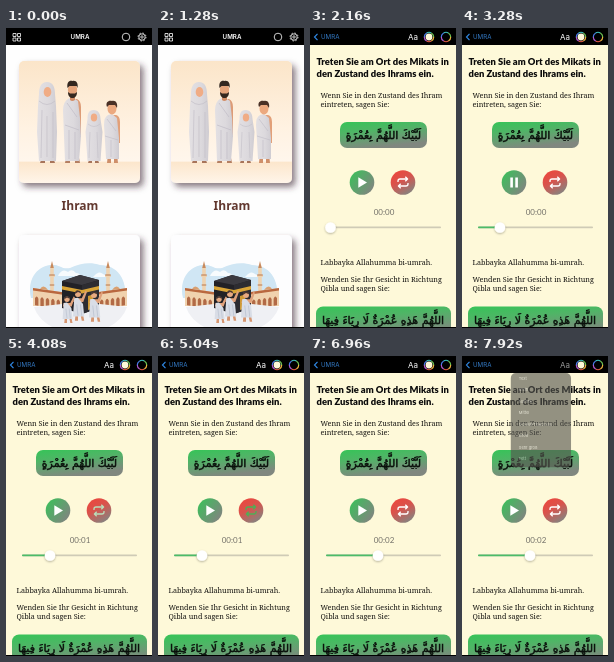
Recreate the animation shown at these times as an HTML page. Size 146 by 300 pixels, loop 8 s.

```html
<!DOCTYPE html>
<html lang="de">
<head>
<meta charset="utf-8">
<title>Umra</title>
<style>
html, body { margin: 0; width: 100%; height: 100%; overflow: hidden; background: #fff; }
svg { display: block; width: 100vw; height: 100vh; }
.title { font: 900 9.4px Lato, sans-serif; fill: #0c0c0c; }
.body { font: 500 7.2px "Noto Serif", serif; fill: #141310; }
.bar { font: 600 6.2px Inter, sans-serif; }
.arabic { font: 11px "DejaVu Sans", sans-serif; fill: #0a100b; stroke: #0a100b; stroke-width: .45; direction: rtl; text-anchor: middle; }
.menu { font: 4px Inter, sans-serif; fill: #d8d8d2; }
</style>
</head>
<body>
<svg viewBox="0 0 146 300" preserveAspectRatio="none">
<defs>
  <linearGradient id="sand" x2="0" y2="1">
    <stop stop-color="#fbe5c9"/><stop offset=".55" stop-color="#fff2e2"/>
    <stop offset=".82" stop-color="#fff6ec"/><stop offset=".83" stop-color="#fce6cc"/><stop offset="1" stop-color="#fff5e9"/>
  </linearGradient>
  <linearGradient id="green" x2=".35" y2="1">
    <stop stop-color="#36c458"/><stop offset=".4" stop-color="#4fb566"/><stop offset="1" stop-color="#80877f"/>
  </linearGradient>
  <linearGradient id="greenDot" x2="1" y2=".7">
    <stop stop-color="#36c458"/><stop offset="1" stop-color="#80857f"/>
  </linearGradient>
  <linearGradient id="redDot" x2=".6" y2="1">
    <stop stop-color="#f0443a"/><stop offset=".5" stop-color="#d9534c"/><stop offset="1" stop-color="#8b807c"/>
  </linearGradient>
  <linearGradient id="robe"><stop stop-color="#e3e0e3"/><stop offset=".6" stop-color="#dcd9dd"/><stop offset="1" stop-color="#cfccd2"/></linearGradient>
  <filter id="shade" x="-20%" y="-20%" width="150%" height="150%">
    <feDropShadow dx="3.5" dy="4" stdDeviation="3" flood-color="#3a2530" flood-opacity=".6"/>
  </filter>
  <filter id="soft" x="-50%" y="-50%" width="200%" height="200%">
    <feDropShadow dx="0" dy="1" stdDeviation="1" flood-opacity=".3"/>
  </filter>
  <clipPath id="card2"><rect x="13" y="207" width="121" height="110" rx="5"/></clipPath>
</defs>

<g id="list">
  <rect width="146" height="300" fill="#fefefe"/>
  <rect x="13" y="33" width="121" height="122" rx="5" fill="url(#sand)" filter="url(#shade)"/>
  <g id="family">
    <!-- mother -->
    <path d="M35 132h4v3h-5zM44 132h4l1 3h-5z" fill="#a8745a"/>
    <path d="M41 54c-6 0-8 5-8 12l-1 12-1 26 2 29h17l1-29-1-26-1-12c0-7-2-12-8-12z" fill="url(#robe)"/>
    <ellipse cx="41.5" cy="64" rx="3.8" ry="5" fill="#f0ac85"/>
    <path d="M33 73q8 7 16 0M36 82l-1 48M47 84v46M41 88v41" fill="none" stroke="#c3bfc8" stroke-width=".7"/>
    <!-- father -->
    <path d="M60 130h4v5h-5zM69 130h4l1 5h-5z" fill="#b57f62"/>
    <path d="M62 71h9q4 2 4 8v30h-4V80z" fill="#dd9c77"/>
    <path d="M62 71l4-2 6 4 2 17 1 18-2 25H59l-1-25-1-26q0-8 5-11z" fill="url(#robe)"/>
    <path d="M61 75l10 14M59 97l14 5M63 102v29M69 104v27" fill="none" stroke="#c0bcc6" stroke-width=".7"/>
    <path d="M64 66h5v6q-3 2-5 0z" fill="#d28d67"/>
    <ellipse cx="66.5" cy="62" rx="4.600" ry="6.300" fill="#e5a57c"/>
    <path d="M61.500 60c-1-6 2-8 5-7 4-1 6 3 5 7l-1-2h-7zM62 64l2 1.500h5l2-1.500c0 4-2 6-4.500 6s-4.500-2-4.500-6z" fill="#33271f"/>
    <!-- daughter -->
    <path d="M83 132h3v3h-4zM89 132h3l1 3h-4z" fill="#a8745a"/>
    <path d="M87.500 82c-5 0-6 4-6 9l-2 13 2 29h13l2-29-2-13c0-5-2-9-7-9z" fill="url(#robe)"/>
    <ellipse cx="88" cy="89.500" rx="3.200" ry="4" fill="#f0ac85"/>
    <path d="M82 96q6 5 12 0M84 104l-1 26M91 104l1 26" fill="none" stroke="#c3bfc8" stroke-width=".6"/>
    <!-- son -->
    <path d="M102 126h3v9h-4zM108 126h3l1 9h-4z" fill="#cf8f6a"/>
    <path d="M102 87h8q4 1 4 7v21h-4V95z" fill="#e2a079"/>
    <path d="M102 87l4-1 5 4 2 20v21h-13l-1-18-1-16q0-8 4-10z" fill="url(#robe)"/>
    <path d="M101 91l9 12M99 108l13 4M105 112v17" fill="none" stroke="#c0bcc6" stroke-width=".6"/>
    <ellipse cx="106" cy="80.500" rx="4.500" ry="6" fill="#eca97f"/>
    <path d="M101 79c-2-5 2-7 5-6 4-1 6 3 5 7l-2-3h-6z" fill="#4a3126"/>
  </g>
  <text x="74" y="182" text-anchor="middle" style="font:800 12px 'Noto Sans',sans-serif" fill="#62382f">Ihram</text>

  <rect x="13" y="207" width="121" height="110" rx="5" fill="#fdfdfe" filter="url(#shade)"/>
  <g clip-path="url(#card2)">
    <path d="M25 270c-4-18 5-31 19-33 8-2 12 5 20 3 10-5 21-6 30-3 17 0 28 14 25 36z" fill="#d0e6f4"/>
    <path d="M53 246q4-6 9-2 4-4 8 1 4 0 4 3H52zM88 248q5-6 9-2l6 3H87z" fill="#f7fbfd"/>
    <g id="towers"></g>
    <g id="arcades"></g>
    <path d="M28 279l28-3h38l27 3q-4 13-20 21H48q-16-8-20-21z" fill="#eff0f4"/>
    <path d="M56 253l18-6 19 5v28l-17 6-20-6z" fill="#222126"/>
    <path d="M56 253l18-6 19 5-17 5z" fill="#3b3a40"/>
    <path d="M76 257l17-5v28l-17 6z" fill="#2d2c31"/>
    <path d="M56 258l20 4 17-4v3.500l-17 4-20-4z" fill="#d9a437"/>
    <path d="M82 268l5-1.500v14l-5 1.500z" fill="#cf9a35"/>
    <g id="pilgrims"></g>
  </g>

  <rect width="146" height="17" fill="#000"/>
  <g fill="none" stroke="#fff" stroke-width=".8">
    <path d="M7 5.500h3v3h-3zM11.500 5.500h3v3h-3zM7 10h3v3h-3zM11.500 10h3v3h-3z"/>
    <circle cx="120" cy="9" r="3.800"/>
    <circle cx="136" cy="9" r="3.200"/><circle cx="136" cy="9" r="1.200"/>
    <circle cx="136" cy="9" r="4" stroke-dasharray="1.570 1.570"/>
  </g>
  <text class="bar" x="74" y="11.300" text-anchor="middle" fill="#fff">UMRA</text>
  <rect id="dim" width="146" height="300" opacity="0"/>
</g>

<g id="detail">
  <rect width="146" height="300" fill="#fef9d9"/>
  <rect width="146" height="17" fill="#000"/>
  <path d="M7.500 5.800L4.500 9l3 3.200" fill="none" stroke="#2f86e0" stroke-width="1.200"/>
  <text class="bar" x="11" y="11.300" fill="#3379c4" style="font-weight:400">UMRA</text>
  <text id="aa" x="98" y="12" fill="#fff" style="font:8px Inter,sans-serif">Aa</text>
  <circle cx="119" cy="9" r="3.400" fill="#fdf8d8"/>
  <g id="rings" fill="none" stroke-width="1.200"></g>

  <text class="title" x="6.500" y="37">Treten Sie am Ort des Mikats in</text>
  <text class="title" x="6.500" y="49">den Zustand des Ihrams ein.</text>
  <text class="body" x="10.500" y="69.500">Wenn Sie in den Zustand des Ihram</text>
  <text class="body" x="10.500" y="79">eintreten, sagen Sie:</text>
  <rect x="30" y="94" width="87" height="26" rx="7" fill="url(#green)"/>
  <text class="arabic" x="73.500" y="110.500">لَبَّيْكَ اللَّهُمَّ بِعُمْرَةٍ</text>

  <circle cx="52" cy="154.500" r="12.300" fill="url(#greenDot)"/>
  <path id="play" d="M48.300 149.300v10.400l8.700-5.200z" fill="#fff"/>
  <path id="pause" d="M48.300 149.500h2.600v10h-2.600zM53.300 149.500h2.600v10h-2.600z" fill="#fff"/>
  <circle cx="93" cy="154.500" r="12.300" fill="url(#redDot)"/>
  <g fill="none" stroke="#fff" stroke-width="1.300" stroke-linejoin="round">
    <path id="repeat" d="M88 154v-1q0-2 2-2h7M95.300 148.800l2.300 2.200-2.300 2.200M98 155v1q0 2-2 2h-7M90.700 155.800l-2.300 2.200 2.300 2.200"/>
  </g>
  <text id="clock" x="74" y="187.300" text-anchor="middle" fill="#74726a" style="font:8px Lato,sans-serif">00:00</text>
  <rect x="16" y="198.600" width="115" height="1.600" rx=".8" fill="#cfcbb6"/>
  <rect id="fill" x="16" y="198.600" width="4" height="1.600" rx=".8" fill="#4cbc68"/>
  <circle id="thumb" cx="20.500" cy="199.500" r="5.300" fill="#fff" filter="url(#soft)"/>

  <text class="body" x="10.500" y="236.500">Labbayka Allahumma bi-umrah.</text>
  <text class="body" x="10.500" y="253.500">Wenden Sie Ihr Gesicht in Richtung</text>
  <text class="body" x="10.500" y="263">Qibla und sagen Sie:</text>
  <rect x="6" y="278.500" width="135" height="30" rx="7" fill="url(#green)"/>
  <text class="arabic" x="73" y="295.500">اللَّهُمَّ هَذِهِ عُمْرَةٌ لَا رِيَاءَ فِيهَا</text>
  <g id="menu">
    <rect x="49" y="17" width="60" height="94" rx="5" fill="#55554f"/>
    <g id="rows"></g>
  </g>
</g>
<rect y="299" width="146" height="1"/>
</svg>
<script>
const LOOP = 8000, START = 20.5, SPEED = 22.2;
const $ = id => document.getElementById(id);
const clamp = v => Math.max(0, Math.min(1, v));
const set = (el, attrs) => { for (const k in attrs) el.setAttribute(k, attrs[k]); };
const each = (id, items, draw) => { $(id).innerHTML = items.map(draw).join(''); };

// Small repeated parts of the drawings
each('towers', [46, 102], x => `
  <path d="M${x - 1.8} 268v-19h-1v-2h1v-7h3.600v7h1v2h-1v19z" fill="#efd3b0"/>
  <path d="M${x - 1.8} 240l1.800-7 1.800 7z" fill="#c98a5c"/>
  <path d="M${x - 2.8} 247h5.600M${x - 2.3} 257h4.600" stroke="#b9764a"/>`);
each('arcades', [[27, 8], [121, -8]], ([x, tilt]) => {
  const dir = Math.sign(tilt);
  let arches = '';
  for (let i = 0; i < 5; i++) arches += `M${2 + i * 5.4} 17v-7q1.700-4 3.400 0v7z`;
  return `<g transform="translate(${x} 260) skewY(${tilt}) scale(${dir} 1)">
    <path d="M0 0h30v14L0 18z" fill="#f0d2ae"/>
    <path d="M0 0h30v2.500H0z" fill="#b9683f"/>
    <path d="${arches}" fill="#b26a46"/>
    <path d="M7 0q4-6 8 0z" fill="#d9a071"/>
  </g>`;
});
each('pilgrims', [[61, 274, 1.1], [72, 269, 1.25], [88, 270, 1.25]], ([x, y, s]) => `
  <g transform="translate(${x} ${y}) scale(${s})">
    <path d="M-2 14h2v5h-2.500zM2 14h2l1 5h-2z" fill="#d59570"/>
    <path d="M-3 1h6l3-6 1.200.7-3 8.300h-8z" fill="#e0a17b"/>
    <path d="M-3 1l3-.5 4 5 1 10h-9z" fill="#d9dde6"/>
    <path d="M-1 6l1 9M2 6l1 9" stroke="#b9c0cf" stroke-width=".6"/>
    <circle cy="-2.500" r="2.400" fill="#e7aa82"/>
    <path d="M-2.500-2.500q0-3 2.600-2.800 2.300 0 2.300 2.300l-2.400-1z" fill="#4a3630"/>
  </g>`);

const hues = ['#f0b640', '#e25a45', '#b65bd0', '#4a7df0', '#3fc3c0', '#6fc955'];
each('rings', [119, 136], x => hues.map((c, i) => {
  const at = k => `${x + 4.7 * Math.cos(k * Math.PI / 3)} ${9 + 4.7 * Math.sin(k * Math.PI / 3)}`;
  return `<path d="M${at(i)}A4.7 4.7 0 0 1 ${at(i + 1)}" stroke="${c}"/>`;
}).join(''));
each('rows', ['Text', 'Klein', 'Normal', 'Mittel', 'SCHRIFTGRÖSSE', 'Groß', 'Sehr groß', 'Fett'],
  (s, i) => `<text class="menu" x="57" y="${24 + i * 11.4}">${s}</text>`);

// [time, slider position]
const track = [[0, START], [2480, START], [3560, 44], [5200, 44], [6280, 68], [LOOP, 68]];
const between = (t, a, b) => t >= a && t < b;
function sample(keys, t) {
  const i = keys.findIndex(k => k[0] > t);
  const [t0, v0] = keys[i - 1], [t1, v1] = keys[i];
  return v0 + (v1 - v0) * (t - t0) / (t1 - t0);
}

function draw(t) {
  const push = 1 - Math.pow(1 - clamp((t - 1400) / 440), 3);
  set($('list'), { transform: `translate(${-44 * push} 0)`, visibility: push < 1 ? 'visible' : 'hidden' });
  set($('dim'), { opacity: .12 * push });
  set($('detail'), { transform: `translate(${146 * (1 - push)} 0)`, visibility: push > 0 ? 'visible' : 'hidden' });

  const x = sample(track, t);
  const playing = between(t, 2480, 3560) || between(t, 5200, 6280);
  set($('thumb'), { cx: x });
  set($('fill'), { width: x - 16 });
  $('clock').textContent = '00:0' + Math.floor((x - START) / SPEED);
  set($('play'), { opacity: playing ? 0 : 1 });
  set($('pause'), { opacity: playing ? 1 : 0 });

  const looped = clamp((t - 4000) / 200) - clamp((t - 6760) / 200);
  set($('repeat'), { stroke: `color-mix(in srgb, #4fae55 ${100 * looped}%, #fff)` });

  const open = clamp((t - 7840) / 160), s = .7 + .6 * open;
  set($('menu'), { opacity: 1.25 * open, transform: `translate(103 15) scale(${s}) translate(-103 -15)` });
  set($('aa'), { opacity: 1 - .8 * open });
}

function tick() {
  draw(performance.now() % LOOP);
  requestAnimationFrame(tick);
}
tick();
</script>
</body>
</html>
```
